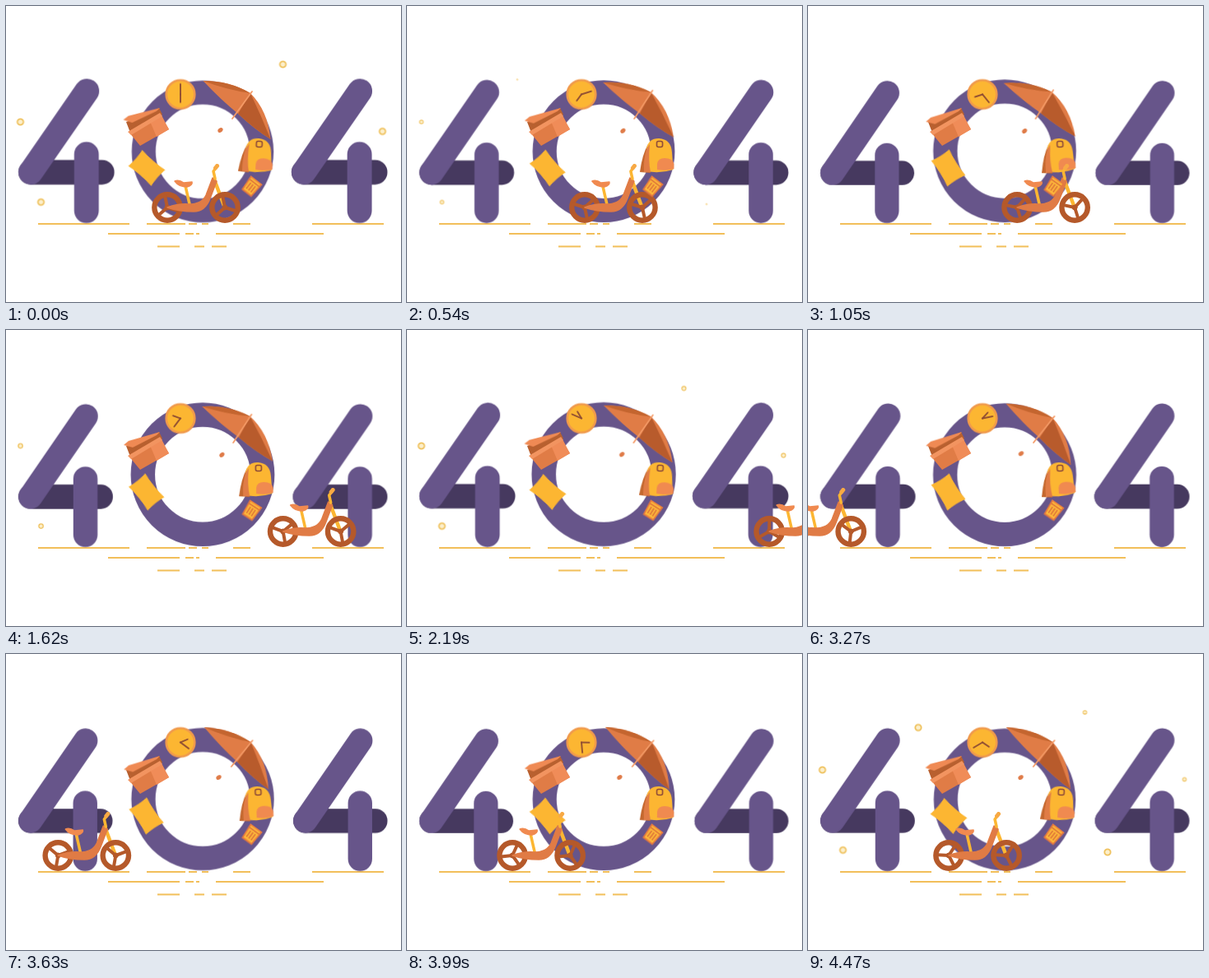
An HTML page for the animation above (4.5 s loop, 480 by 360 pixels).

```html
<!DOCTYPE html>
<html lang="en">
<head>
<meta charset="utf-8">
<title>404</title>
<style>
@property --x { syntax: "<number>"; inherits: true; initial-value: 196; }
html, body { margin: 0; width: 100%; height: 100%; overflow: hidden; background: #fff; }
svg { display: block; width: 100vw; height: 100vh; }
svg * { animation: 4.5s linear infinite; }

/* digits */
.four { animation-name: breathe; }
.left { transform-origin: 14px 264px; }
.right { transform-origin: 132px 264px; }
@keyframes breathe {
  0% { transform: scale(.997, .998); animation-timing-function: cubic-bezier(.3, .1, .6, 1); }
  24.4% { transform: scale(.975, .983); animation-timing-function: cubic-bezier(.37, 0, .63, 1); }
  56.7% { transform: none; animation-timing-function: cubic-bezier(.37, 0, .63, 1); }
  88.9% { transform: scale(.975, .983); animation-timing-function: cubic-bezier(.4, 0, .8, .6); }
  100% { transform: scale(.982, .988); }
}
#ring { transform-origin: 239px 263px; animation: grow 2.25s ease-in-out infinite alternate; }
@keyframes grow { from { transform: scale(.986); } to { transform: scale(1.002); } }

/* bicycle */
#bike { transform: translate(calc(var(--x) * 1px), 245px); animation-name: ride; }
.spin { transform: rotate(calc(var(--x) * 3deg)); }
@keyframes ride {
  0% { --x: 196; animation-timing-function: cubic-bezier(.333, .211, .667, .336); }
  23.333% { --x: 254; animation-timing-function: cubic-bezier(.333, .255, .667, .611); }
  36% { --x: 336.5; animation-timing-function: cubic-bezier(.333, .307, .667, .644); }
  48.667% { --x: 440; }
  60% { --x: 542; animation-timing-function: step-end; }
  60.667% { --x: -134; }
  72.667% { --x: -18; animation-timing-function: cubic-bezier(.333, .361, .667, .787); }
  88.667% { --x: 128; animation-timing-function: cubic-bezier(.333, .495, .667, .771); }
  99.333% { --x: 171; }
  100% { --x: 173; }
}

/* floating things */
#umbrella { transform-origin: 276px 115px; animation-name: sway; }
@keyframes sway {
  0% { transform: none; animation-timing-function: cubic-bezier(.3, .2, .6, 1); }
  21% { transform: rotate(-4.3deg); animation-timing-function: cubic-bezier(.35, .1, .6, 1); }
  91% { transform: rotate(3.4deg); animation-timing-function: ease-in; }
  100% { transform: rotate(3deg); }
}
#pillow { animation: tilt 1.125s ease-in-out infinite alternate; }
@keyframes tilt {
  from { transform: translate(171px, 197px) rotate(41deg); }
  to { transform: translate(170.5px, 197px) rotate(58deg); }
}
#pack { transform-origin: 307px 182px; animation: rock 1.125s ease-in-out infinite alternate; }
#book { transform-origin: 298px 219px; animation: rock 2.25s ease-in-out infinite alternate; }
@keyframes rock { from { transform: rotate(3deg); } to { transform: rotate(-3deg); } }
#flap { transform-origin: 187px 125px; animation: lift 1.125s ease-in-out infinite alternate; }
@keyframes lift { from { transform: rotate(2deg); } to { transform: rotate(-1deg); } }
#long { animation-name: long; }
#short { animation-name: short; }
@keyframes long { from { transform: rotate(0); } to { transform: rotate(603deg); } }
@keyframes short { from { transform: rotate(180deg); } to { transform: rotate(486deg); } }

/* sparkles */
.dot { transform-box: fill-box; transform-origin: center; }
.a { animation-name: dotA; }
.b { animation-name: dotB; }
.c { animation-name: dotC; }
@keyframes dotA {
  0%, 10% { transform: none; }
  15%, 33.5% { transform: scale(0); }
  37%, 56% { transform: none; }
  62%, 90% { transform: scale(0); }
  96%, 100% { transform: none; }
}
@keyframes dotB {
  0%, 6% { transform: none; }
  11%, 46% { transform: scale(0); }
  50%, 65% { transform: none; }
  70%, 97% { transform: scale(0); }
  100% { transform: scale(.75); }
}
@keyframes dotC {
  0%, 11% { transform: scale(0); }
  15%, 19% { transform: none; }
  23%, 54% { transform: scale(0); }
  59%, 64% { transform: none; }
  69%, 91% { transform: scale(0); }
  96%, 100% { transform: none; }
}
</style>
</head>
<body>
<svg viewBox="0 0 480 360">
  <defs>
    <g id="digit" fill="none" stroke="#67558a" stroke-width="30" stroke-linecap="round">
      <path d="M30 202H117" stroke="#46395f"/>
      <path d="M30 202L98.500 103M98 180V249"/>
    </g>
    <g id="wheel" fill="none" stroke="#b5592a">
      <circle r="15.700" stroke-width="6.400"/>
      <path class="spin" d="M0 0V-14M0 0L12 7M0 0L-12 7" stroke-width="4"/>
      <circle r="3" fill="#b5592a"/>
    </g>
    <circle id="spark" r="3.700" fill="#fcefcb" stroke="#efc25f" stroke-width="1.800"/>
  </defs>

  <path d="M39 265H150M171 265H218M222 265H232M238 265H246M276 265H297M372 265H459
           M124 277H211M218 277H228M231 277H235M255 277H386
           M184 292.500H211M229 292.500H241M250 292.500H268"
        stroke="#f2bf5a" stroke-width="2"/>

  <use href="#digit" class="four left"/>
  <g transform="translate(331.500)"><use href="#digit" class="four right"/></g>
  <circle id="ring" cx="239" cy="175.700" r="72.700" fill="none" stroke="#67558a" stroke-width="29.500"/>

  <g id="pack">
    <path d="M293 168Q286 180 283 202L296 203Z" fill="#c4682f"/>
    <path d="M291 199V174Q293 161 306 161Q321 162 322 178L323.500 199Q308 204 291 201Z" fill="#fcb632"/>
    <path d="M291 174Q287 188 288 202L296 202Q293 188 295 168Z" fill="#e07c46"/>
    <rect x="303.500" y="164.500" width="7" height="7" rx="2" fill="none" stroke="#8c4a38" stroke-width="1.600"/>
    <path d="M304 199V192Q305 185 313 185Q323 185 324.500 192V198Q315 201 304 199Z" fill="#f08a50"/>
  </g>

  <path id="pillow" d="M-18.500 -13Q0 -10.500 18.500 -13Q16.500 0 18.500 13Q0 10.500 -18.500 13Q-16.500 0 -18.500 -13Z"
        fill="#fcb632"/>

  <g id="bike" fill="none" stroke-linecap="round" stroke-linejoin="round">
    <path d="M57 -34L69 -2" stroke="#fcb632" stroke-width="4.500"/>
    <use href="#wheel"/>
    <use href="#wheel" x="70"/>
    <path d="M22 -26L27 -4" stroke="#fcb632" stroke-width="3.500"/>
    <path d="M0 0Q14 -5 26 -4Q42 -4 47 -15L55 -36L60 -32L52 -11Q46 5 32 5Q14 5 0 0Z"
          fill="#e07b45" stroke="#e07b45" stroke-width="1.500"/>
    <path d="M9 -32Q14 -34 20 -30L30 -31Q31 -27 24 -25Q14 -25 9 -32Z"
          fill="#f08a50" stroke="#f08a50" stroke-width="1.500"/>
    <path d="M58 -35L56 -44L59 -48" stroke="#fcb632" stroke-width="3.500"/>
    <path d="M58.500 -48L60.500 -50.500" stroke="#f7a944" stroke-width="5"/>
  </g>

  <g id="umbrella">
    <path d="M239.500 91Q272 91 297 106Q318 127 321.500 162Q302 150 282 131Q261 114 239.500 91Z" fill="#e07c46"/>
    <path d="M239.500 91Q272 91 297 106Q268 102 239.500 91Z" fill="#c4652f"/>
    <path d="M297 106Q310 133 321.500 162Q302 150 282 131Z" fill="#b85b2c"/>
    <path d="M299 104L275 137" stroke="#f49a66" stroke-width="1.800" stroke-linecap="round"/>
    <ellipse rx="3.400" ry="2.500" transform="translate(260.500 151) rotate(-40)" fill="#df7b48"/>
  </g>

  <g transform="translate(212 107.500)">
    <circle r="17.300" fill="#fcb632" stroke="#f09a4c" stroke-width="2.600"/>
    <g stroke="#8c4a32" stroke-width="1.800" stroke-linecap="round">
      <path id="long" d="M0 0V-12.500"/>
      <path id="short" d="M0 0V-9.500"/>
    </g>
  </g>

  <path d="M149 153L186 131L198 150L163 170Z" fill="#e07c46"/>
  <path d="M174 138L188 131L198 150L183 159Z" fill="#f08c58"/>
  <path d="M146 141L186 124L190 132L151 154Z" fill="#b8602f"/>
  <path id="flap" d="M143 140L149 135L187 124L183 128L154 143Z" fill="#ef8a54"/>
  <path d="M148 153L187 130L190 134L152 157Z" fill="#f29460"/>

  <g id="book">
    <g transform="translate(298.500 219.500) rotate(35)">
      <path d="M-9 -10H9L7.500 10.500H-7.500Z" fill="#e5793f"/>
      <path d="M-7 -8.500H7L6 8.500H-6Z" fill="#fcb63a"/>
      <path d="M-7 -5.500H7M-3.500 -3V6M0 -3V6M3.500 -3V6" stroke="#dc7038" stroke-width="1.500"/>
    </g>
  </g>

  <g transform="translate(17.500 141)"><use href="#spark" class="dot a"/></g>
  <g transform="translate(42.500 238.500)"><use href="#spark" class="dot a"/></g>
  <g transform="translate(336.500 71)"><use href="#spark" class="dot b"/></g>
  <g transform="translate(457.500 152.500)"><use href="#spark" class="dot b"/></g>
  <g transform="translate(134 89.500)"><use href="#spark" class="dot c"/></g>
  <g transform="translate(364 241)"><use href="#spark" class="dot c"/></g>
</svg>
</body>
</html>
```
